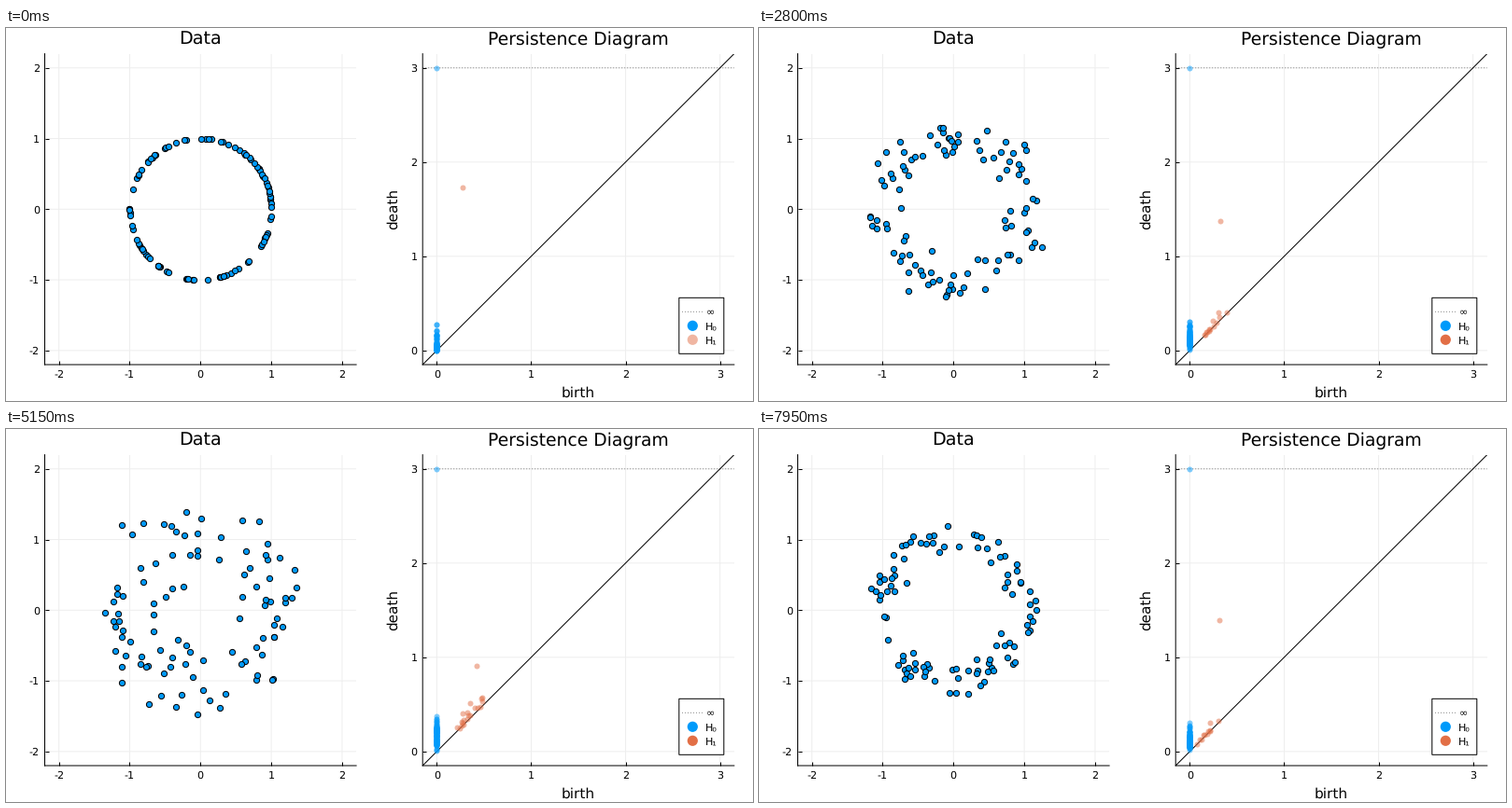
Write a matplotlib script that moves like this. It is 800 by 400 pixels and loops after 8 s.

```python
import matplotlib.pyplot as plt
import numpy as np
from matplotlib.animation import FuncAnimation
from matplotlib.lines import Line2D
from matplotlib.patches import Circle, Rectangle

W, H, DPI = 800, 400, 100
FRAMES, STEP = 160, 50
POINTS = 100
NOISE_STEP, PEAK = 0.005, 100
INF = 3
BLUE, ORANGE = "#009afa", "#e26f46"
PX = 72 / DPI  # points per pixel

plt.rcParams.update({"font.family": "DejaVu Sans", "axes.linewidth": PX,
                     "path.snap": False, "text.hinting": "none"})


def sample(frame):
    """Random points on the unit circle, shaken by uniform noise in x and y."""
    rng = np.random.default_rng(400 + frame)
    noise = NOISE_STEP * min(frame, 2 * PEAK - frame)
    angle = rng.uniform(0, 2 * np.pi, POINTS)
    circle = np.column_stack([np.cos(angle), np.sin(angle)])
    return circle + rng.uniform(-noise, noise, (POINTS, 2))


def persistence(pts):
    """Vietoris-Rips persistence in dimensions 0 and 1, by cocycles mod 2.

    Neighbour sets and cocycle rows are kept as integer bit masks.
    """
    n = len(pts)
    dist = np.hypot(*(pts[:, None] - pts[None]).transpose(2, 0, 1))
    limit = dist.max(axis=1).min()
    i, j = np.triu_indices(n, 1)
    length = dist[i, j]
    order = np.argsort(length)
    edges = zip(i[order].tolist(), j[order].tolist(), length[order].tolist())

    near = [0] * n
    comp = list(range(n))
    alive, h0, h1 = [], [], []
    for a, b, d in edges:
        if d > limit:
            break
        bit_a, bit_b = 1 << a, 1 << b
        lune = near[a] & near[b]
        near[a] |= bit_b
        near[b] |= bit_a
        if not lune:
            if comp[a] != comp[b]:
                old, new = comp[b], comp[a]
                comp = [new if c == old else c for c in comp]
                h0.append((0, d))
            else:
                rows = [0] * n
                rows[a], rows[b] = bit_b, bit_a
                alive.append((d, rows))
            continue

        # Extend each cocycle over the edge by its first triangle.
        low = lune & -lune
        broken = []
        for birth, rows in alive:
            defect = (rows[a] ^ rows[b]) & lune
            if defect & low:
                rows[a] |= bit_b
                rows[b] |= bit_a
                defect ^= lune
            if defect:
                broken.append([birth, rows, defect])
        # The youngest broken cocycle dies and repairs the older ones.
        while broken:
            birth, young, defect = broken.pop()
            h1.append((birth, d))
            alive = [c for c in alive if c[1] is not young]
            pivot = defect & -defect
            for item in broken:
                if item[2] & pivot:
                    item[1][:] = [p ^ q for p, q in zip(item[1], young)]
                    item[2] ^= defect
            broken = [item for item in broken if item[2]]
    return h0, h1


def make_axes(left, lo, hi, ticks):
    ax = fig.add_axes([left / W, 39 / H, 333.6 / W, 333.4 / H])
    ax.set(xlim=(lo, hi), ylim=(lo, hi))
    labels = [str(t) for t in ticks]
    ax.set_xticks(ticks, labels)
    ax.set_yticks(ticks, labels)
    ax.tick_params(direction="in", length=4 * PX, width=PX, labelsize=11.1 * PX)
    ax.tick_params(axis="x", pad=5.3 * PX)
    ax.tick_params(axis="y", pad=5.5 * PX)
    ax.grid(color="#eeeeee", linewidth=PX)
    ax.set_axisbelow(True)
    ax.spines[["top", "right"]].set_visible(False)
    return ax


def label(x, y, text, size, **kw):
    """Text at a pixel position counted from the top left."""
    fig.text(x / W, 1 - y / H, text, fontsize=size * PX, **kw)


def dots(ax, diameter, **kw):
    return ax.scatter([], [], s=(diameter * PX) ** 2, clip_on=False,
                      zorder=3, **kw)


def make_legend():
    """Overlay in pixels; returns the marker of the second group."""
    ax = fig.add_axes([0, 0, 1, 1])
    ax.set(xlim=(0, W), ylim=(H, 0))
    ax.axis("off")
    ax.add_patch(Rectangle((720.8, 289.3), 48, 60, fc="white", ec="black", lw=PX))
    rows = [304.3 + 15 * k for k in range(3)]
    ax.add_line(Line2D([724, 746], [rows[0]] * 2, **dotted))
    ax.add_patch(Circle((735.3, rows[1]), 5.6, fc=BLUE, lw=0))
    marker = ax.add_patch(Circle((735.3, rows[2]), 5.6, fc=ORANGE, lw=0))
    for y, text in zip(rows, ["∞", "H₀", "H₁"]):
        ax.text(749.3, y + 4.2, text, fontsize=11.1 * PX, va="baseline")
    return marker


fig = plt.figure(figsize=(W / DPI, H / DPI), dpi=DPI, facecolor="white")
dotted = dict(color="black", alpha=0.45, lw=PX, ls=(0, (1, 2)))

data_ax = make_axes(41.5, -2.2, 2.2, range(-2, 3))
diag_ax = make_axes(446.2, -0.15, 3.15, range(4))
diag_ax.plot([-0.15, 3.15], [-0.15, 3.15], color="black", lw=PX)
diag_ax.plot([-0.15, 3.15], [INF, INF], **dotted)

label(208, 18, "Data", 19.2, ha="center", va="baseline")
label(612.8, 18, "Persistence Diagram", 18.8, ha="center", va="baseline")
label(613, 396, "birth", 15.4, ha="center", va="baseline")
label(415, 194, "death", 15.2, ha="center", va="center", rotation=90)

cloud = dots(data_ax, 6.2, facecolor=BLUE, edgecolor="black", linewidth=PX)
pairs0 = dots(diag_ax, 6, facecolor=BLUE, linewidth=0, alpha=0.5)
pairs1 = dots(diag_ax, 6, facecolor=ORANGE, linewidth=0, alpha=0.5)
legend_dot = make_legend()


def update(frame):
    pts = sample(frame)
    h0, h1 = persistence(pts)
    cloud.set_offsets(pts)
    pairs0.set_offsets(h0 + [(0, INF)])
    pairs1.set_offsets(np.reshape(h1, (-1, 2)))
    # The legend dot is painted once per pair, so it gains opacity.
    legend_dot.set_alpha(1 - 0.5 ** len(h1))
    return cloud, pairs0, pairs1, legend_dot


anim = FuncAnimation(fig, update, frames=FRAMES, interval=STEP,
                     repeat=True, repeat_delay=0, blit=False)
plt.show()
```
